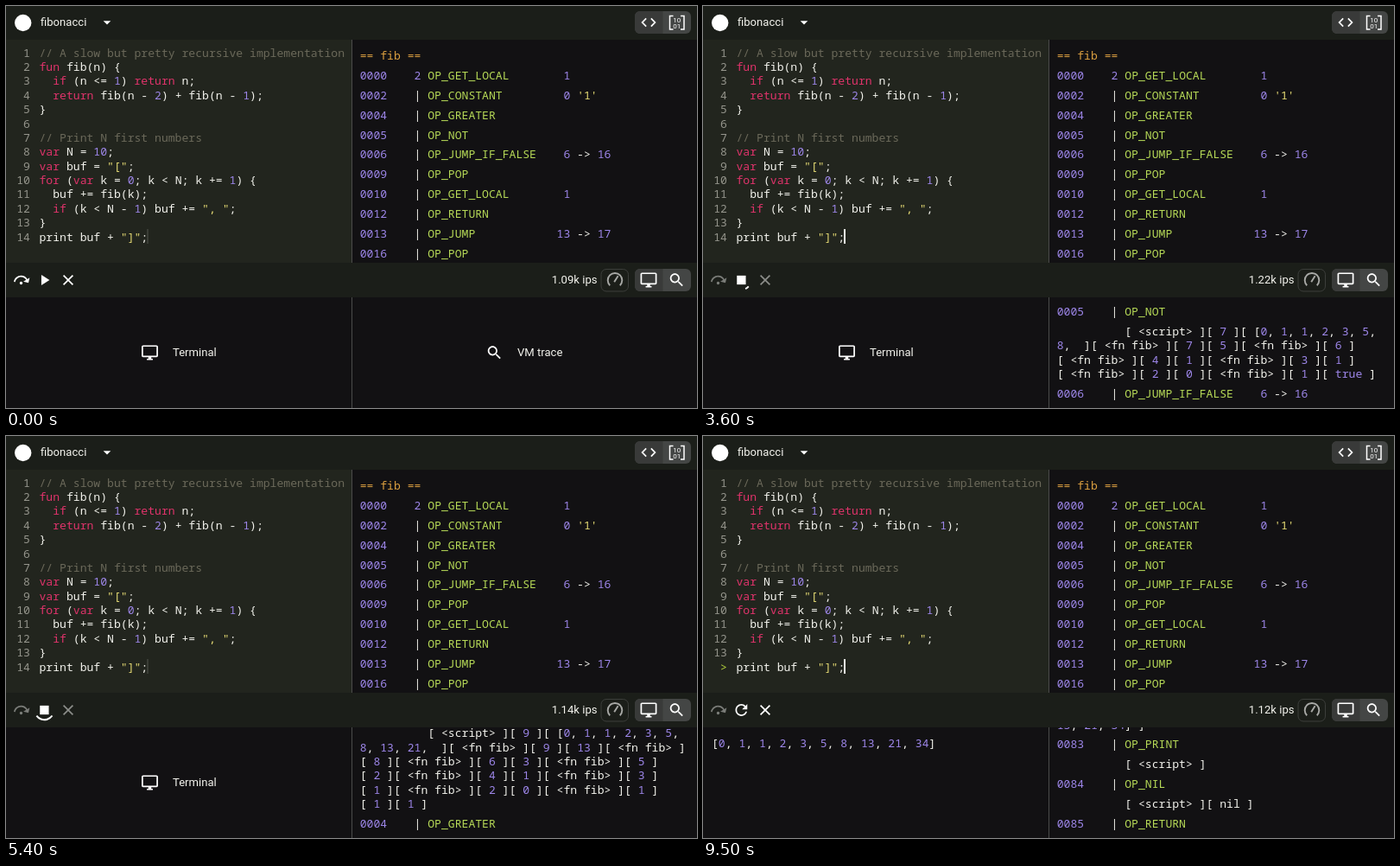
Write an HTML page that moves like this. It is 800 px wide and 465 px high and loops after 9600 ms.

```html
<!DOCTYPE html>
<html lang="en">
<head>
<meta charset="utf-8">
<title>Bytecode playground</title>
<style>
html, body { margin: 0; width: 100%; height: 100%; overflow: hidden; background: #121113; }
#stage { position: relative; width: 800px; height: 465px; overflow: hidden; color: #f4f4ee; }
#stage > * { position: absolute; }
.bar { left: 0; width: 800px; background: #1b1e19; }
.mono { font: 13.1px/16.37px "Noto Sans Mono", "DejaVu Sans Mono", monospace; white-space: pre; }
.ui { font: 13.1px/20px Roboto, Arial, sans-serif; white-space: pre; }
.panel { left: 400px; width: 399px; border-left: 1px solid #4b4c4a; overflow: hidden; }
.rows { position: absolute; left: 8.7px; width: 380px; }
.row { padding: 3.25px 0; white-space: pre-wrap; }
.comment { color: #6b695a; }
.string { color: #e6db74; }
.keyword { color: #e0336b; }
.op { color: #b6d957; }
.title { color: #dca041; }
.number { color: #9d86e9; }
.marker { color: #b5d33d; }
</style>
</head>
<body>
<div id="stage">
  <div class="bar" style="top:0;height:39px"></div>
  <div style="left:0;top:39px;width:400px;height:258px;background:#22251e"></div>
  <div class="mono" id="gutter" style="left:0;top:45.7px;width:27.9px;text-align:right;color:#95958c"></div>
  <div class="mono" id="editor" style="left:38.5px;top:45.7px"></div>
  <div id="cursor" style="left:163px;top:258px;width:2px;height:17px;background:#f8f8f0"></div>
  <div class="panel mono" style="top:39px;height:258px"><div class="rows" id="listing" style="top:6.8px"></div></div>
  <div class="bar" style="top:297px;height:40px"></div>
  <div class="panel mono" style="top:337px;height:128px"><div class="rows" id="trace" style="bottom:5.5px"></div></div>
  <div class="mono" id="output" style="left:10px;top:347.4px"></div>
  <svg id="icons" width="800" height="465"></svg>
  <div class="ui" style="left:40px;top:9px">fibonacci</div>
  <div class="ui" id="speed" style="right:115.5px;top:307px"></div>
  <div class="ui" id="terminalLabel" style="left:193px;top:391px">Terminal</div>
  <div class="ui" id="traceLabel" style="left:592px;top:391px">VM trace</div>
</div>
<script>
const $ = id => document.getElementById(id);
const LOOP = 9600, DONE = 6100;

const SOURCE = `// A slow but pretty recursive implementation
fun fib(n) {
  if (n <= 1) return n;
  return fib(n - 2) + fib(n - 1);
}

// Print N first numbers
var N = 10;
var buf = "[";
for (var k = 0; k < N; k += 1) {
  buf += fib(k);
  if (k < N - 1) buf += ", ";
}
print buf + "]";`;

// Each line: source line, operation, operand, constant
const FIB = assemble(`2 GET_LOCAL 1
2 CONSTANT 0 1
2 GREATER
2 NOT
2 JUMP_IF_FALSE 16
2 POP
2 GET_LOCAL 1
2 RETURN
2 JUMP 17
2 POP
3 GET_GLOBAL 1 fib
3 GET_LOCAL 1
3 CONSTANT 2 2
3 SUBTRACT
3 CALL 1
3 GET_GLOBAL 3 fib
3 GET_LOCAL 1
3 CONSTANT 4 1
3 SUBTRACT
3 CALL 1
3 ADD
3 RETURN`);

const MAIN = assemble(`1 CONSTANT 1 "<fn fib>"
1 DEFINE_GLOBAL 0 fib
7 CONSTANT 3 10
7 DEFINE_GLOBAL 2 N
8 CONSTANT 5 "["
8 DEFINE_GLOBAL 4 buf
9 CONSTANT 6 0
9 GET_LOCAL 1
9 GET_GLOBAL 7 N
9 LESS
9 JUMP_IF_FALSE 76
9 POP
9 JUMP 37
9 GET_LOCAL 1
9 CONSTANT 8 1
9 ADD
9 SET_LOCAL 1
9 POP
9 LOOP 14
10 GET_GLOBAL 9 buf
10 GET_GLOBAL 10 fib
10 GET_LOCAL 1
10 CALL 1
10 ADD
10 SET_GLOBAL 9 buf
10 POP
11 GET_LOCAL 1
11 GET_GLOBAL 11 N
11 CONSTANT 12 1
11 SUBTRACT
11 LESS
11 JUMP_IF_FALSE 72
11 POP
11 GET_GLOBAL 13 buf
11 CONSTANT 14 ", "
11 ADD
11 SET_GLOBAL 13 buf
11 POP
11 JUMP 73
11 POP
12 LOOP 26
12 POP
12 POP
13 GET_GLOBAL 15 buf
13 CONSTANT 16 "]"
13 ADD
13 PRINT
13 NIL
13 RETURN`);

function assemble(text) {
  let at = 0, last;
  return text.split('\n').map(entry => {
    const [, line, op, arg, rest] = entry.match(/^(\d+) (\w+) ?(\d*) ?(.*)$/);
    const jump = /JUMP|LOOP/.test(op);
    const value = op == 'CONSTANT' ? JSON.parse(rest) : rest;
    let label = `${String(at).padStart(4, 0)} ${(line == last ? '|' : line).padStart(4)} `;
    if (jump) label += `OP_${op}`.padEnd(16) + String(at).padStart(5) + ` -> ${arg}`;
    else if (arg) label += `OP_${op}`.padEnd(16) + arg.padStart(5) + (rest && ` '${value}'`);
    else label += `OP_${op}`;
    const instruction = { at, op, arg: +arg, value, label };
    at += jump ? 3 : arg ? 2 : 1;
    last = line;
    return instruction;
  });
}

// Lines may break between cells and inside lists, but not within a value
const cell = v => `[ ${v} ]`.replace(/ (?!\d)|(?<!,) /g, '\u00a0');

// Executes the program, recording every instruction and the stack after it
function run() {
  const globals = {}, stack = ['<script>'], calls = [], log = [];
  let code = MAIN, ip = 0, base = 0, output = '';
  const push = v => stack.push(v), pop = () => stack.pop(), top = () => stack[stack.length - 1];
  const binary = f => { const b = pop(); push(f(pop(), b)); };
  const jump = at => { ip = code.findIndex(c => c.at == at); };
  const ops = {
    CONSTANT: i => push(i.value),
    NIL: () => push('nil'),
    POP: pop,
    NOT: () => push(!pop()),
    ADD: () => binary((a, b) => a + b),
    SUBTRACT: () => binary((a, b) => a - b),
    LESS: () => binary((a, b) => a < b),
    GREATER: () => binary((a, b) => a > b),
    GET_LOCAL: i => push(stack[base + i.arg]),
    SET_LOCAL: i => { stack[base + i.arg] = top(); },
    GET_GLOBAL: i => push(globals[i.value]),
    SET_GLOBAL: i => { globals[i.value] = top(); },
    DEFINE_GLOBAL: i => { globals[i.value] = pop(); },
    JUMP: i => jump(i.arg),
    LOOP: i => jump(i.arg),
    JUMP_IF_FALSE: i => { if (!top()) jump(i.arg); },
    PRINT: () => { output = pop(); },
    CALL: i => {
      calls.push([code, ip, base]);
      base = stack.length - i.arg - 1;
      code = FIB;
      ip = 0;
    },
    RETURN: () => {
      const result = pop();
      stack.length = base;
      push(result);
      [code, ip, base] = calls.pop();
    }
  };
  for (;;) {
    const i = code[ip++], entry = { label: i.label };
    log.push(entry);
    if (i.op == 'RETURN' && !calls.length) return { log, output };
    ops[i.op](i);
    entry.stack = ' '.repeat(10) + stack.map(cell).join('\u200b');
  }
}

const KINDS = ['comment', 'string', 'keyword', 'op', 'title', 'number'];
const TOKENS = /(\/\/.*)|("[^"]*"|'[^']*')|\b(fun|if|return|var|for)\b|(OP_\w+)|(== .*)|\b(\d+|true|false)\b/g;
const paint = text => text.replace(/</g, '&lt;').replace(TOKENS,
  (m, ...groups) => `<span class="${KINDS[groups.findIndex(Boolean)]}">${m}</span>`);
const row = text => `<div class="row">${paint(text)}</div>`;

const ICON = {
  code: 'M9.4 16.6L4.8 12l4.6-4.6L8 6l-6 6 6 6zm5.2 0l4.6-4.6-4.6-4.6L16 6l6 6-6 6z',
  down: 'M7 10l5 5 5-5z',
  over: 'M12 14a2 2 0 1 1 0 4a2 2 0 1 1 0-4M23.46 8.86L21.87 15.75L15 14.16L18.8 11.78C17.39 9.5 14.87 8 12 8C8.05 8 4.77 10.86 4.12 14.63L2.15 14.28C2.96 9.58 7.06 6 12 6C15.58 6 18.73 7.89 20.5 10.72z',
  play: 'M8 5v14l11-7z',
  stop: 'M6 6h12v12H6z',
  again: 'M17.65 6.35C16.2 4.9 14.21 4 12 4c-4.42 0-7.99 3.58-7.99 8s3.57 8 7.99 8c3.73 0 6.84-2.55 7.73-6h-2.08c-.82 2.33-3.04 4-5.65 4-3.31 0-6-2.69-6-6s2.69-6 6-6c1.66 0 3.14.69 4.22 1.78L13 11h7V4z',
  close: 'M19 6.41L17.59 5 12 10.59 6.41 5 5 6.41 10.59 12 5 17.59 6.41 19 12 13.41 17.59 19 19 17.59 13.41 12z',
  screen: 'M21 2H3c-1.1 0-2 .9-2 2v12c0 1.1.9 2 2 2h7v2H8v2h8v-2h-2v-2h7c1.1 0 2-.9 2-2V4c0-1.1-.9-2-2-2zm0 14H3V4h18z',
  search: 'M15.5 14h-.79l-.28-.27C15.41 12.59 16 11.11 16 9.5 16 5.91 13.09 3 9.5 3S3 5.91 3 9.5 5.91 16 9.5 16c1.61 0 3.09-.59 4.23-1.57l.27.28v.79l5 4.99L20.49 19zm-6 0C7.01 14 5 11.99 5 9.5S7.01 5 9.5 5 14 7.01 14 9.5 11.99 14 9.5 14z'
};
const icon = (name, x, y, id = '') =>
  `<path id="${id}" fill="#fff" d="${ICON[name]}" transform="translate(${x} ${y}) scale(.86) translate(-12 -12)"/>`;
const toggle = y => `<rect x="728" y="${y}" width="65" height="26" rx="6" fill="#444645"/>
  <path d="M760.5 ${y}h-26.5a6 6 0 0 0-6 6v14a6 6 0 0 0 6 6h26.5z" fill="#393a39"/>`;

$('icons').innerHTML = toggle(6) + toggle(304) +
  '<circle cx="19.7" cy="19.5" r="9.7" fill="#fff"/>' +
  icon('down', 117, 19) + icon('code', 744, 19) +
  `<path d="M772.5 11.5h-4v15.5h4M781 11.5h4v15.5h-4" fill="none" stroke="#fff" stroke-width="1.5"/>
  <g fill="#fff" font-family="Roboto, sans-serif" font-size="8" text-anchor="middle">
    <text x="776.8" y="18.7">10</text><text x="776.8" y="26">01</text></g>
  <rect x="689" y="304.5" width="31.5" height="25.5" rx="6" fill="none" stroke="#3c3e3b"/>
  <path d="M699.2 323.2a8.3 8.3 0 1 1 11.6 0M704.2 319.2l4.4-7" fill="none" stroke="#a8a9a6" stroke-width="1.9"/>` +
  icon('screen', 744, 317) + icon('search', 776.5, 317) +
  icon('over', 17.5, 317, 'over') + icon('play', 44.4, 317, 'main') + icon('close', 72, 317, 'close') +
  '<circle id="spinner" cx="44.4" cy="317" r="11.2" pathLength="127" fill="none" stroke="#fff" stroke-width="2"/>' +
  icon('screen', 166.5, 401, 'terminalIcon') + icon('search', 565.5, 401, 'traceIcon');

const { log, output } = run();
$('editor').innerHTML = paint(SOURCE);
$('listing').innerHTML = row('== fib ==') + FIB.map(i => row(i.label)).join('');

// Time, batches of 100 instructions, thousands of instructions per second
const PACE = [[2535, 0, 1.4], [3000, 6, 1.29], [3600, 13, 1.22], [4500, 23, 1.17], [5400, 33, 1.14], [6000, 38, 1.12], [DONE, 39, 1.12]];
function pace(t, column) {
  const n = PACE.findIndex(p => p[0] >= t), a = PACE[n - 1], b = PACE[n];
  return a[column] + (b[column] - a[column]) * (t - a[0]) / (b[0] - a[0]);
}

const ease = x => (1 - Math.cos(Math.PI * x)) / 2;
const show = (id, on) => { $(id).style.display = on ? '' : 'none'; };

function spin(t) {
  const p = ((t - 3000) / 1400 + 1.495) % 1, u = ease(p * 2 % 1);
  const start = p < .5 ? 15 * u : 15 + 110 * u;
  const length = Math.min(p < .5 ? 1 + 99 * u : 100, 127 - start);
  $('spinner').setAttribute('stroke-dasharray', `0 ${start} ${length} 200`);
  $('spinner').setAttribute('transform', `rotate(${320 + .175 * (t - 3000)} 44.4 317)`);
}

function blink(t) {
  const away = Math.abs((t + 800) % 1000 - 500);
  return 1 - ease(Math.min(1, Math.max(0, (away - 190) / 140)));
}

let shown;
function draw(now) {
  requestAnimationFrame(draw);
  const t = Math.floor(now % LOOP / 100) * 100;
  if (t === shown) return;
  shown = t;
  const idle = t < PACE[0][0], done = t >= DONE, running = !idle && !done;
  const steps = idle ? 0 : done ? log.length : 100 * Math.round(pace(t, 1));

  $('trace').innerHTML = log.slice(Math.max(0, steps - 8), steps)
    .map((e, i, all) => row(e.label) + (i < all.length - 1 ? row(e.stack) : '')).join('');
  $('speed').textContent = (idle ? 1.09 : done ? 1.12 : pace(t, 2)).toFixed(2) + 'k ips';
  $('output').innerHTML = done ? paint(output) : '';
  $('gutter').innerHTML = SOURCE.split('\n')
    .map((_, i) => done && i == 13 ? '<span class="marker">&gt;</span>' : i + 1).join('\n');

  $('main').setAttribute('d', ICON[idle ? 'play' : done ? 'again' : 'stop']);
  $('over').setAttribute('fill', idle ? '#fff' : '#7b7d79');
  $('close').setAttribute('fill', running ? '#8b8d89' : '#fff');
  for (const id of ['terminalIcon', 'terminalLabel']) show(id, !done);
  for (const id of ['traceIcon', 'traceLabel']) show(id, idle);
  show('spinner', running);
  if (running) spin(t);
  $('cursor').style.opacity = blink(t);
}
requestAnimationFrame(draw);
</script>
</body>
</html>
```
